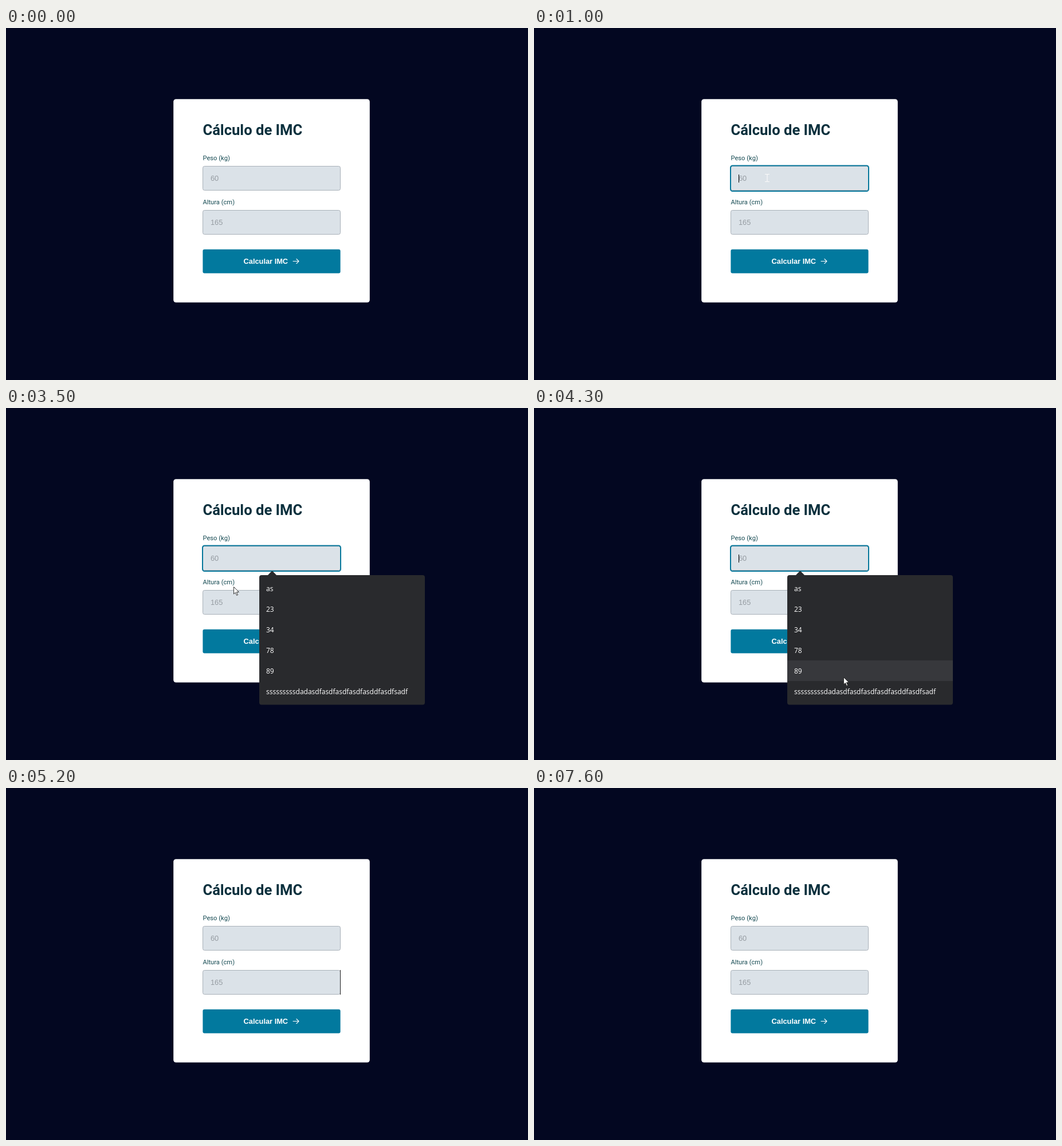
Write an HTML page that moves like this. It is 911 px wide and 615 px high and loops after 8 s.

```html
<!DOCTYPE html>
<html lang="pt">
<head>
<meta charset="utf-8">
<title>Cálculo de IMC</title>
<style>
  html, body { margin: 0; width: 100%; height: 100%; overflow: hidden; background: #030721; }
  svg { display: block; width: 911px; height: 615px; }
  .title { font: 700 25.6px Roboto, sans-serif; fill: #0b303d; }
  .label { font: 400 11.2px Roboto, sans-serif; fill: #154a52; }
  .hint { font: 400 12.8px "Liberation Sans", Arial, sans-serif; fill: #969ca2; }
  .action { font: 700 12.8px "Liberation Sans", Arial, sans-serif; fill: #fff; }
  .option { font: 400 12px "Open Sans", sans-serif; fill: #fff; }
  .input { fill: #dbe2e8; stroke: #a9b1b9; }
</style>
</head>
<body>
<svg viewBox="0 0 911 615">
  <rect width="911" height="615" fill="#030721"/>
  <rect x="292.2" y="124.2" width="342.6" height="355.4" rx="4.5" fill="#fff"/>
  <text class="title" x="343.4" y="187">Cálculo de IMC</text>
  <g id="fields"></g>
  <rect id="ring" x="343" y="240.5" width="241" height="44.5" rx="3.5" fill="none" stroke="#06779b" stroke-width="2"/>
  <rect x="343.4" y="386.8" width="240.2" height="41.6" rx="3" fill="#02799e"/>
  <text class="action" x="414.6" y="412">Calcular IMC</text>
  <path d="M501 407.5H511M507 403.5L511 407.5L507 411.5" fill="none" stroke="#fff" stroke-width="1.1" stroke-linecap="round" stroke-linejoin="round"/>

  <rect id="titleCaret" x="517" y="163" width="1" height="30" fill="#0b303d"/>
  <rect id="inputCaret" x="357" y="256" width="1" height="14" fill="#000"/>
  <rect id="edgeCaret" x="583" y="318" width="1" height="43" fill="#222"/>

  <g id="popup">
    <path d="M456 293L463.3 285.6Q464.5 284.4 465.7 285.6L473 293Z" fill="#292a2d"/>
    <rect x="442" y="292" width="289" height="226.5" rx="4" fill="#292a2d"/>
    <rect id="hover" x="442" width="289" height="36" fill="#37383c"/>
    <g id="options"></g>
  </g>

  <path id="arrow" d="M.5 .5V13L3.4 10.3L5.6 15.4L7.6 14.5L5.4 9.6H9.5Z" fill="#fff" stroke="#222" stroke-width=".9"/>
  <path id="beam" d="M-4 -6.5H-1L0 -5.5L1 -6.5H4M0 -5.5V5.5M-4 6.5H-1L0 5.5L1 6.5H4" fill="none" stroke="#fafafa" stroke-width="1.1"/>
</svg>
<script>
const $ = id => document.getElementById(id);
const LOOP = 8000, STEP = 100, FIELD = 77, ROW = 36, ROW_TOP = 297;

function add(parent, tag, attrs, text = "") {
  const el = document.createElementNS("http://www.w3.org/2000/svg", tag);
  for (const name in attrs) el.setAttribute(name, attrs[name]);
  el.textContent = text;
  $(parent).append(el);
}

[["Peso (kg)", "60"], ["Altura (cm)", "165"]].forEach(([label, hint], i) => {
  const y = FIELD * i;
  add("fields", "text", { class: "label", x: 343.4, y: y + 231 }, label);
  add("fields", "rect", { class: "input", x: 343.5, y: y + 241.5, width: 240, height: 42, rx: 3 });
  add("fields", "text", { class: "hint", x: 357, y: y + 267 }, hint);
});

const words = ["as", "23", "34", "78", "89", "sssssssssdadasdfasdfasdfasdfasddfasdfsadf"];
words.forEach((word, i) =>
  add("options", "text", { class: "option", x: 454, y: ROW_TOP + 23 + ROW * i }, word));

// Each move starts where the last one ended, unless it has its own `from`.
const moves = [
  { start: 100, end: 900, from: [16, 0], to: [407, 262], sag: 170 },
  { start: 1400, end: 1600, to: [404, 318] },
  { start: 2100, end: 2500, to: [397, 312] },
  { start: 3900, end: 4300, to: [540, 470] },
  { start: 4400, end: 4700, to: [824, 555] },
  { start: 5400, end: 5800, from: [779, 300], to: [187, 86] },
  { start: 5900, end: 6700, to: [103, 0] }
];
moves.forEach((m, i) => m.from = m.from || moves[i - 1].to);

const within = (t, a, b) => t >= a && t < b;
const clamp = k => Math.max(0, Math.min(1, k));
const show = (id, on) => $(id).setAttribute("visibility", on ? "visible" : "hidden");

// Caret is lit for the first half of each second after `start`.
const blink = (t, start, end) => within(t, start, end) && (t - start) % 1000 < 500;

function pointerAt(t) {
  if (!within(t, 100, 4800) && !within(t, 5400, 6800)) return null;
  const { start, end, from, to, sag = 0 } = moves.filter(m => m.start <= t).pop();
  const k = clamp((t - start) / (end - start));
  const [x, y] = from.map((a, i) => a + (to[i] - a) * k);
  return [Math.round(x), Math.round(y + sag * Math.sin(Math.PI * k))];
}

const popupOpacity = t => t < 5100 ? clamp((t - 1000) / 300) : clamp((5200 - t) / 250);

function draw(ms) {
  const t = Math.floor(ms % LOOP / STEP) * STEP;
  show("ring", within(t, 1000, 5100));
  show("titleCaret", blink(t, 500, 1000));
  show("inputCaret", blink(t, 1000, 5100));
  show("edgeCaret", blink(t, 5100, LOOP));
  $("popup").setAttribute("opacity", popupOpacity(t));

  const pos = pointerAt(t);
  const beam = within(t, 900, 2200);
  show("beam", pos && beam);
  show("arrow", pos && !beam);
  let row = -1;
  if (pos) {
    const [x, y] = pos;
    $(beam ? "beam" : "arrow").setAttribute("transform", `translate(${x} ${y})`);
    if (within(t, 4000, 5000) && within(x, 442, 731)) row = Math.floor((y - ROW_TOP) / ROW);
  }
  const hovered = within(row, 0, words.length);
  show("hover", hovered);
  if (hovered) $("hover").setAttribute("y", ROW_TOP + ROW * row);
}

const begin = performance.now();
function tick(now) {
  draw(Math.max(0, now - begin));
  requestAnimationFrame(tick);
}
draw(0);
requestAnimationFrame(tick);
</script>
</body>
</html>
```
